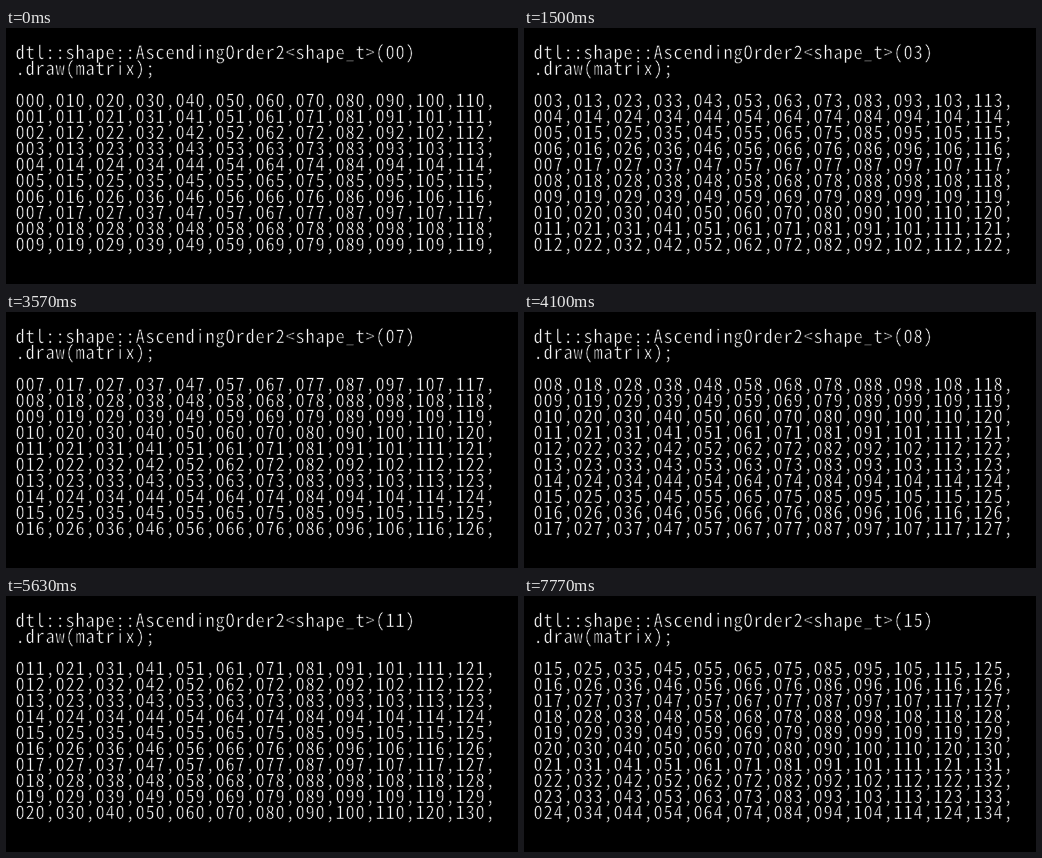
Recreate the animation shown at these times as an HTML page. Size 512x256 px, loop 8000 ms.

```html
<!DOCTYPE html>
<html lang="en">
<head>
<meta charset="utf-8">
<title>Ascending order matrix</title>
<style>
  html, body { margin: 0; width: 100%; height: 100%; overflow: hidden; background: #000; }
  svg { display: block; width: 512px; height: 256px; }
  /* The background-coloured outline thins the strokes of the letters. */
  text {
    fill: #fff;
    stroke: #000;
    stroke-width: .55px;
    stroke-linejoin: round;
    font: 300 18.5px "Noto Sans Mono CJK JP", "Noto Sans CJK JP", "Noto Sans CJK", "Liberation Mono", monospace;
    font-feature-settings: "hwid", "kern" 0;
    font-variant-ligatures: none;
    letter-spacing: .75px;
    text-rendering: geometricPrecision;
    white-space: pre;
  }
</style>
</head>
<body>
<svg viewBox="0 0 512 256"></svg>
<script>
  const LOOP = 8000, ROWS = 10, COLUMNS = 12, LINE_HEIGHT = 16;
  const stepTimes = [500, 1030, 1500, 2030, 2530, 3070, 3570, 4100,
                     4530, 5100, 5630, 6130, 6670, 7170, 7700];
  const svg = document.querySelector('svg');

  function addLine(index) {
    const line = document.createElementNS(svg.namespaceURI, 'text');
    line.setAttribute('x', 9.5);
    line.setAttribute('y', 31.3 + index * LINE_HEIGHT);
    return svg.appendChild(line);
  }

  const pad = (value, length) => String(value).padStart(length, '0');
  const header = addLine(0);
  addLine(1).textContent = '.draw(matrix);';
  const rows = Array.from({ length: ROWS }, (_, i) => addLine(i + 3));
  let shown = -1;

  function show(start) {
    header.textContent = `dtl::shape::AscendingOrder2<shape_t>(${pad(start, 2)})`;
    rows.forEach((row, y) => {
      row.textContent = Array.from({ length: COLUMNS },
        (_, x) => pad(start + y + x * ROWS, 3) + ',').join('');
    });
    shown = start;
  }

  function tick() {
    const time = performance.now() % LOOP;
    const start = stepTimes.filter(t => t <= time).length;
    if (start !== shown) show(start);
    requestAnimationFrame(tick);
  }
  tick();
</script>
</body>
</html>
```
